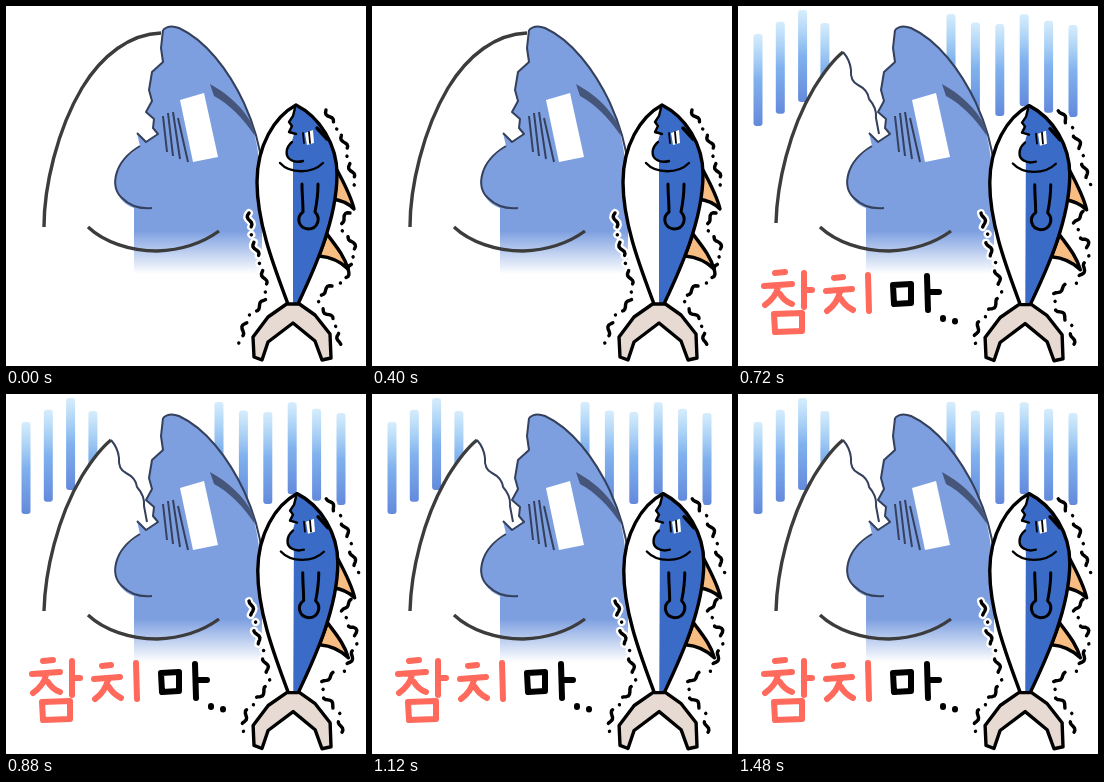
Recreate the animation shown at these times as an HTML page. Size 360 by 360 pixels, loop 1560 ms.

```html
<!DOCTYPE html>
<html lang="ko">
<head>
<meta charset="utf-8">
<style>
html, body { margin: 0; width: 100%; height: 100%; overflow: hidden; background: #fff; }
svg { display: block; width: 100vw; height: 100vh; }
.ln { fill: none; stroke: #000; stroke-width: 3.4; stroke-linecap: round; stroke-linejoin: round; }
.ghost { fill: none; stroke: #3c3c3c; stroke-width: 3.4; stroke-linejoin: round; }
.thin { stroke-width: 2; stroke: #34405c; }
.word { fill: none; stroke-width: 6; stroke-linecap: round; stroke-linejoin: round; }
.halo { fill: none; stroke: #fff; stroke-width: 8; stroke-linecap: round; }
.dash { stroke-dasharray: 16 9 .1 9; }
</style>
</head>
<body>
<svg viewBox="0 0 360 360" xmlns="http://www.w3.org/2000/svg">
  <defs>
    <linearGradient id="fade" gradientUnits="userSpaceOnUse" x1="0" y1="225" x2="0" y2="268">
      <stop offset="0" stop-color="#7d9fe0"/>
      <stop offset="1" stop-color="#7d9fe0" stop-opacity="0"/>
    </linearGradient>
    <linearGradient id="rain" x1="0" y1="0" x2="0" y2="1">
      <stop offset="0" stop-color="#5cb4f2" stop-opacity=".25"/>
      <stop offset=".5" stop-color="#4a90e6" stop-opacity=".7"/>
      <stop offset="1" stop-color="#2f62d0" stop-opacity=".75"/>
    </linearGradient>
    <path id="body" d="M290 99C268 111 251 140 251 176C251 218 269 263 282 298L292 298C308 264 331 214 331 168C331 139 314 111 290 99Z"/>
    <clipPath id="skin"><use href="#body"/></clipPath>
    <g id="trails">
      <path d="M320 104C326 118 338 128 341 146S348 170 350 184"/>
      <path d="M344 207C330 214 334 226 346 234C352 250 342 272 330 282"/>
      <path d="M326 280C315 286 308 293 318 304S333 318 333 340"/>
      <path d="M243 207C244 240 262 268 260 290C256 304 236 306 234 340"/>
    </g>
  </defs>

  <g id="gloom"></g>

  <path id="whole" class="ghost" d="M38 221C38 181 51 124 76 82C96 49 124 28 155 27"/>
  <g id="bitten">
    <path fill="#fff" d="M38 217C39 178 51 124 76 82C86 66 95 54 105 46L116 75L135 101L140 128L128 202L82 221Z"/>
    <path class="ghost" d="M38 217C39 178 51 124 76 82C86 66 95 54 105 46"/>
    <path class="ghost thin" d="M105 46Q112 54 113 64Q112 75 120 79Q130 84 131 93Q139 102 138 112L141 128"/>
  </g>

  <g id="face">
    <path fill="url(#fade)" d="M157 24Q163 18 173 22C199 34 222 63 238 97C250 124 254 152 256 184V268H128V202C111 196 105 178 112 162C117 151 127 147 134 140L131 127L140 136L152 128L147 122L148 113L140 106L146 95L143 84L146 66L157 56L155 42Z"/>
    <path class="ghost" d="M82 221C98 236 124 245 151 245C176 244 198 236 213 225"/>
    <path class="ghost thin" d="M134 140C107 156 104 181 116 192C125 201 136 203 146 202"/>
    <path class="ghost thin" d="M157 24L155 42L157 56L146 66L143 84L146 95L140 106L148 113L147 122L152 128L140 136L131 127"/>
    <path class="ghost thin" d="M157 24Q163 18 173 22C199 34 222 63 238 97C248 119 254 140 256 160"/>
    <path fill="#46557a" d="M204 78C222 88 237 101 247 120L249 130C237 112 223 98 208 90Z"/>
    <path class="ghost thin" d="M157 110L161 146M162 107L167 150M167 106L174 153M172 112L182 156"/>
    <path fill="#fff" d="M174 94L198 87L212 151L187 156Z"/>
  </g>

  <g id="text" role="img" aria-label="참치 마..">
    <path class="word" stroke="#ff6a5c" d="M37 267L47 266M26 280L54 278M40 281Q38 291 27 299M42 288Q46 295 54 298M66 267V301M67 284H74M36 308L64 307V325L37 326ZM96 272L105 271M88 285L114 283M102 286Q99 298 89 305M103 293Q107 300 115 304M130 269L131 305"/>
    <path class="word" stroke="#000" d="M155 279L173 278V297L156 298ZM189 270L190 304M191 286H201M205 312v1M217 315v.5"/>
  </g>

  <g id="marks">
    <path class="halo dash"/>
    <path class="ln dash"/>
  </g>
  <g id="fish">
    <path class="ln" style="fill:#f7bd82" d="M331 164C338 177 345 190 348 203C342 197 335 194 326 193Z"/>
    <path class="ln" style="fill:#f7bd82" d="M321 228C329 239 338 249 342 263C334 255 325 251 313 250Z"/>
    <path class="ln" style="fill:#e6dad3" d="M282 297L262 311L247 331L248 351L256 354L262 336L287 317L309 335L316 354L325 352L324 328L309 309L292 297Z"/>
    <use href="#body" fill="#fff"/>
    <path clip-path="url(#skin)" fill="#3a6cc7" d="M289 96L287 109L283 115L285 121L282 127L288 128L286 135L281 143L281 150L287 156V300H340V96Z"/>
    <use href="#body" class="ln"/>
    <path class="ln" style="stroke-width:2.4" d="M289 102L287 110L283 116L286 120L283 126L290 128M286 136C279 142 279 151 285 154Q290 157 297 155M274 157C284 168 306 168 317 157"/>
    <path class="ln" d="M311 122L321 133"/>
    <path fill="#fff" d="M299 127L307 124L308 137L301 139Z"/>
    <path class="ln" style="stroke-width:1.8" d="M297 127L298 137M303 126L304 137"/>
    <path class="ln" style="stroke-width:3" d="M296 178C296 188 297 196 297 206C290 211 292 222 302 223C312 223 315 212 309 206C311 196 312 187 312 178"/>
  </g>
</svg>
<script>
const LOOP = 1560, STEP = 40, TICK = 32, OPEN = 21;
const $ = id => document.getElementById(id);

// Streaks of gloom on both sides of the head
const streak = (x, y) =>
  `<rect x="${x - 4.5}" y="${y}" width="9" height="92" rx="3" fill="url(#rain)"/>`;
let streaks = '';
for (let i = 0; i < 4; i++) streaks += streak(20 + 22.3 * i, 16 + 12 * Math.cos(1.6 * i));
for (let i = 0; i < 6; i++) streaks += streak(213 + 24.4 * i, 14 - 6 * Math.cos(2 * i));
$('gloom').innerHTML = streaks;

// A trail with a sine ripple across its direction
function ripple(path, phase) {
  const pts = [];
  for (let s = 0; s < path.getTotalLength() - 1; s += 2) {
    const a = path.getPointAtLength(s), b = path.getPointAtLength(s + 1);
    const off = 2 * Math.sin(s * .42 + phase);
    pts.push(`${(a.x - (b.y - a.y) * off).toFixed(1)} ${(a.y + (b.x - a.x) * off).toFixed(1)}`);
  }
  return 'M' + pts.join('L');
}
const trails = [...$('trails').children];
const ripples = [0, 1.5].map(phase => trails.map(p => ripple(p, phase)).join(''));

const show = (id, on) => $(id).setAttribute('visibility', on ? 'visible' : 'hidden');
const move = (id, how) => $(id).setAttribute('transform', how);

// The fish flips every 2 ticks and the words every 3, seen on a 40 ms grid
function draw(t) {
  const tick = Math.floor(Math.floor(t / STEP) * STEP / TICK);
  const pose = Math.floor(tick / 2) % 2, nudge = Math.floor(tick / 3) % 2 === 0;
  const open = tick >= OPEN;
  show('whole', !open);
  ['bitten', 'gloom', 'text'].forEach(id => show(id, open));
  move('text', nudge ? 'translate(-2 -1)' : '');
  move('fish', pose ? 'rotate(.25 287 354) translate(0 .6)' : '');
  move('marks', pose ? 'translate(2 0)' : '');
  for (const p of $('marks').children) p.setAttribute('d', ripples[pose]);
}

const start = performance.now();
function run() {
  draw((performance.now() - start) % LOOP);
  requestAnimationFrame(run);
}
draw(0);
requestAnimationFrame(run);
</script>
</body>
</html>
```
